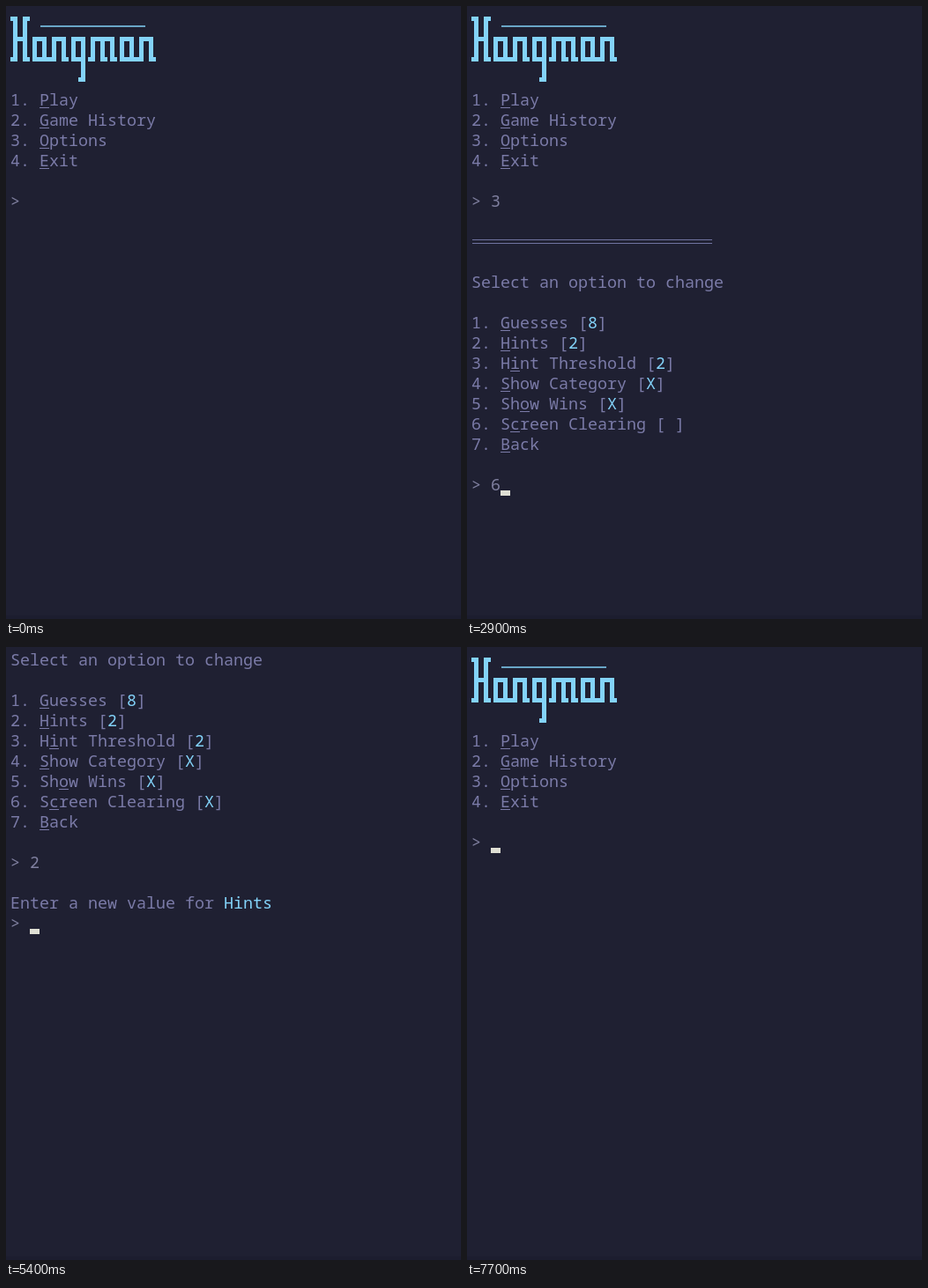
Animation, 516 px wide and 696 px high, one loop 8000 ms. Source, as an HTML page:

```html
<!DOCTYPE html>
<html lang="en">
<head>
<meta charset="utf-8">
<title>Hangman</title>
<style>
  html, body { margin: 0; width: 100%; height: 100%; overflow: hidden; background: #1f2032; }
  #stage { position: relative; width: 516px; height: 696px; overflow: hidden; }
  #stage > * { position: absolute; }
  #edge { left: 0; bottom: 0; width: 100%; height: 4px; background: #1c1d2f; }
  pre {
    left: 5px; top: 2px; margin: 0; color: #7b7ba8;
    font: 18.3333px/23px "Noto Sans Mono", "DejaVu Sans Mono", monospace;
    font-variant-ligatures: none;
  }
  pre u { text-decoration: underline 1px; text-underline-offset: 2px; text-decoration-skip-ink: none; }
  pre b { font-weight: 400; color: #83d3f9; }
  pre i { font-style: normal; color: #8080a0; }
  #logo { left: 0; top: 0; fill: none; stroke: #83d3f9; }
  #rule { left: 6px; top: 265px; width: 272px; height: 3px; border: solid #7073a0; border-width: 1.5px 0; }
  #cursor { width: 11px; height: 6px; background: #dfdfd4; }
</style>
</head>
<body>
<div id="stage">
  <svg id="logo" width="180" height="90">
    <path id="strokes" stroke-width="5"/>
    <path d="M39 23H158" stroke-width="1.5"/>
  </svg>
  <pre id="text"></pre>
  <div id="rule"></div>
  <div id="cursor"></div>
  <div id="edge"></div>
</div>
<script>
const LOOP = 8000, TICK = 100, BLINK = 530;
const CELL_W = 11, CELL_H = 23;
const $ = id => document.getElementById(id);

// Title lettering: every box character is a set of arms from its cell centre.
const ARMS = { '┓': 'LD', '┏': 'RD', '┛': 'LU', '┗': 'RU', '┣': 'UDR', '┫': 'UDL', '┳': 'LRD', '┻': 'LRU' };
const TITLE = ['┓┏', '┣┫┏┓┏┓┏┓┏┳┓┏┓┏┓', '┛┗┗┻┛┗┗┫┛┗┗┗┻┛┗', '       ┛'];

function titlePath() {
  const half = 2.5;
  const arm = {
    L: (x, y) => `M${x + half} ${y}H${x - 5.5}`,
    R: (x, y) => `M${x - half} ${y}H${x + 5.5}`,
    U: (x, y) => `M${x} ${y + half}V${y - 11.5}`,
    D: (x, y) => `M${x} ${y - half}V${y + 11.5}`
  };
  return TITLE.map((line, row) => [...line].map((ch, col) =>
    [...(ARMS[ch] || '')].map(a => arm[a](10.5 + col * CELL_W, 14.5 + row * CELL_H)).join('')
  ).join('')).join('');
}

// Markup: *x* is underlined, {x} is highlighted, lines starting with > are input.
const menu = (input = '') => `\n\n\n\n1. *P*lay
2. *G*ame History
3. *O*ptions
4. *E*xit

> ${input}`;

const options = (hints, clearing, input = '') => `Select an option to change

1. *G*uesses [{8}]
2. *H*ints [{${hints}}]
3. H*i*nt Threshold [{2}]
4. *S*how Category [{X}]
5. Sh*o*w Wins [{X}]
6. S*c*reen Clearing [{${clearing}}]
7. *B*ack

> ${input}`;

const first = input => menu('3') + '\n\n\n\n' + options(2, ' ', input);
const prompt = input => options(2, 'X', '2') + `\n\nEnter a new value for {Hints}\n> ${input}`;

const step = (at, text, extra = {}) => ({ at, text, blinkFrom: at, ...extra });
const logo = true, rule = true;
const STEPS = [
  step(0, menu(), { logo, blinkFrom: -1000 }),
  step(600, menu('3'), { logo }),
  step(900, first(''), { logo, rule, blinkFrom: 850 }),
  step(2700, first('6'), { logo, rule }),
  step(3100, options(2, 'X'), { blinkFrom: 3050 }),
  step(4800, options(2, 'X', '2')),
  step(5100, prompt(''), { blinkFrom: 5060 }),
  step(5800, prompt('5')),
  step(6000, '\n'.repeat(14)),
  step(6100, options(5, 'X'), { blinkFrom: 6050 }),
  step(7200, options(5, 'X', '7')),
  step(7400, menu(), { logo, blinkFrom: 7390 })
];

const toHtml = text => text
  .replace(/^>.*$/gm, line => `<i>${line.replace('>', '&gt;')}</i>`)
  .replace(/\*(.)\*/g, '<u>$1</u>')
  .replace(/\{(.*?)\}/g, '<b>$1</b>');

const show = (id, on) => { $(id).style.visibility = on ? 'visible' : 'hidden'; };

function showStep(s) {
  // The leading newline is kept because innerHTML on an existing pre does not strip it.
  $('text').innerHTML = toHtml(s.text);
  show('logo', s.logo);
  show('rule', s.rule);
  const lines = s.text.split('\n');
  $('cursor').style.left = 5 + lines.at(-1).length * CELL_W + 'px';
  $('cursor').style.top = 21 + (lines.length - 1) * CELL_H + 'px';
}

let current;
function frame() {
  const t = Math.floor(performance.now() % LOOP / TICK) * TICK;
  const s = STEPS.findLast(({ at }) => at <= t);
  if (s !== current) showStep(current = s);
  show('cursor', Math.floor((t - s.blinkFrom) / BLINK) % 2 === 0);
  requestAnimationFrame(frame);
}

$('strokes').setAttribute('d', titlePath());
frame();
</script>
</body>
</html>
```
